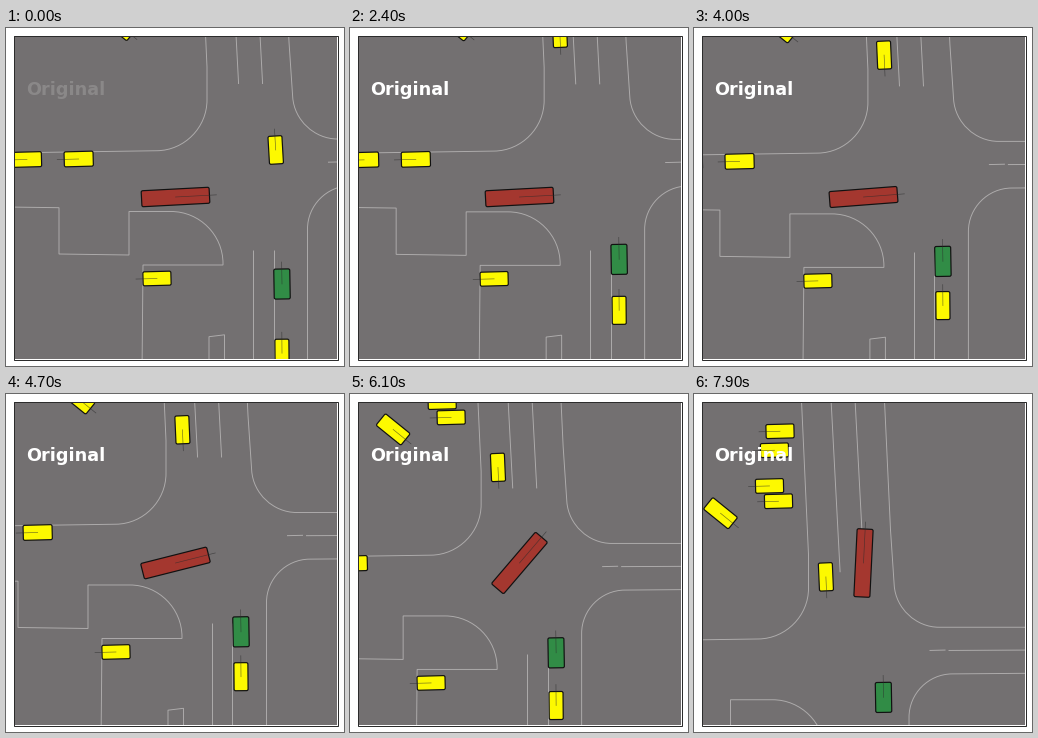
A matplotlib script that plays this animation: 338 by 338 pixels, repeating every 8 s.

```python
import matplotlib.pyplot as plt
import numpy as np
from matplotlib.animation import FuncAnimation
from matplotlib.patches import FancyBboxPatch, PathPatch, Rectangle
from matplotlib.path import Path
from matplotlib.transforms import Affine2D

SIZE, DPI = 338, 64
PX = 72 / DPI
FRAMES, STEP = 80, 100
GROUND, KERB = "#737071", "#aeacac"
YELLOW, GREEN, RED = "#fdf900", "#318c46", "#a4372f"
HUB = (169.5, 169)

fig = plt.figure(figsize=(SIZE / DPI, SIZE / DPI), dpi=DPI, facecolor="white")
ax = fig.add_axes([0, 0, 1, 1])
ax.set(xlim=(0, SIZE), ylim=(SIZE, 0))
ax.axis("off")

panel = Rectangle((8, 8), 323, 323, fc=GROUND, ec="none", zorder=0)
ax.add_patch(panel)
ax.add_patch(Rectangle((7.5, 7.5), 324, 324, fc="none", ec="#2c2c2c", lw=PX, zorder=20))

camera = Affine2D()


def kerb(*points):
    """Polyline in street coordinates; a third value rounds that corner."""
    verts, codes = [points[0]], [Path.MOVETO]
    for k in range(1, len(points)):
        p = np.array(points[k][:2], float)
        if len(points[k]) == 2:
            verts.append(p)
            codes.append(Path.LINETO)
            continue
        radius = points[k][2]
        back, ahead = (np.array(points[j][:2]) - p for j in (k - 1, k + 1))
        back, ahead = (radius * d / np.hypot(*d) for d in (back, ahead))
        verts += [p + back, p + 0.45 * back, p + 0.45 * ahead, p + ahead]
        codes += [Path.LINETO] + [Path.CURVE4] * 3
    line = PathPatch(Path(verts, codes), fc="none", ec=KERB, lw=0.95 * PX, zorder=1,
                     transform=camera + ax.transData)
    ax.add_patch(line)
    line.set_clip_path(panel)


# The four corners of the junction
kerb((-5, 125), (201, 122, 50), (201, 39), (194, -115))
kerb((277, -115), (283, 14), (289.5, 111, 42), (425, 111))
kerb((425, 157), (301.5, 158, 43), (301.5, 345))
kerb((0, 179), (53, 179.7), (53, 226), (123, 227), (123, 183.5),
     (217, 183.5, 52), (217, 237), (137, 237), (136, 345))
kerb((203, 345), (203, 308.7), (218.5, 306.8), (218.5, 345))
# Lane markings
for x in (229, 253):
    kerb((x - 5.4, -115), (x + 3.6, 56))
for x in (247, 267.5):
    kerb((x, 222), (x, 345))
for x0, x1 in ((322, 338), (341, 425)):
    kerb((x0, 134.2), (x1, 133.8))


class Vehicle:
    def __init__(self, place, heading, length=28, width=14, color=YELLOW):
        """place and heading are functions of time, in seconds."""
        self.place, self.heading = place, heading
        self.pose = Affine2D()
        body = FancyBboxPatch((-length / 2, -width / 2), length, width,
                              boxstyle="round,pad=0,rounding_size=1.6",
                              fc=color, ec="#111111", lw=1.2 * PX, zorder=3)
        nose = plt.Line2D([0, length / 2 + 7], [0, 0], color="#2a2a2a", alpha=0.65,
                          lw=0.65 * PX, zorder=4)
        for art in (body, nose):
            art.set_transform(self.pose + camera + ax.transData)
            ax.add_artist(art)
            art.set_clip_path(panel)

    def move(self, t):
        self.pose.clear().rotate_deg(-self.heading(t)).translate(*self.place(t))


def parked(x, y, angle=181.5, length=28, width=14):
    return Vehicle(lambda t: (x, y), lambda t: angle, length, width)


def driving(place, angle, *look):
    return Vehicle(place, lambda t: angle, *look)


def queued(t, stop, gap, halt, go):
    """Brake evenly to a stop, wait, then pull away northwards."""
    return stop + gap * max(0, 1 - t / halt) ** 2 - 1.66 * max(0, t - go) ** 2.5


def turn(t, start, angle):
    """Left turn that eases from 3 degrees through the given angle."""
    u = np.clip((t - start) / 4.65, 0, 1)
    return 3 + angle * u * u * (3 - 2 * u)


# Route of the red truck: distance grows as a power of time along its course
clock = np.linspace(0, 8, 801)
dist = 0.645 * clock ** 2.7
course = np.radians(turn(clock[:-1] + 0.005, 3.0, 81.5))
route_x = np.append(0, np.cumsum(np.diff(dist) * np.cos(course)))
route_y = np.append(0, np.cumsum(np.diff(dist) * -np.sin(course)))


def route(t):
    return np.interp(t, clock, route_x), np.interp(t, clock, route_y)


def truck_place(t):
    x, y = route(t)
    return HUB[0] + x, HUB[1] + y


vehicles = [
    parked(151, 250.5),
    parked(72.7, 131, length=29, width=15),
    parked(21, 131.5, length=29, width=15),
    parked(113, -3, -39, 32, 15),
    parked(171, -15),
    parked(162, -30.3),
    parked(167, -66),
    parked(172.5, -85),
    driving(lambda t: (269.7 - 3.2 * t, 122 - 61 * t), 93.3),
    driving(lambda t: (216 + 0.3 * t, 29.5 + 4 * (t - 5) + 0.8 * (t - 5) ** 3), 272.5),
    driving(lambda t: (276, queued(t, 231, 25, 2.45, 4)), 91, 30, 16, GREEN),
    driving(lambda t: (276, queued(t, 275.2, 50, 3.8, 5)), 90.5),
    Vehicle(truck_place, lambda t: turn(t, 3.65, 86), 68, 16, RED),
]

title = ax.text(20, 67, "Original", color="white", family="DejaVu Sans",
                weight="bold", size=17.6 * PX, va="baseline", zorder=10)


def draw(i):
    t = i * STEP / 1000
    x, y = route(t)
    camera.clear().translate(-x, -y)
    for v in vehicles:
        v.move(t)
    title.set_alpha(min(1, 0.17 + t))
    return []


anim = FuncAnimation(fig, draw, frames=FRAMES, interval=STEP, repeat=True,
                     repeat_delay=0, blit=False)
plt.show()
```
